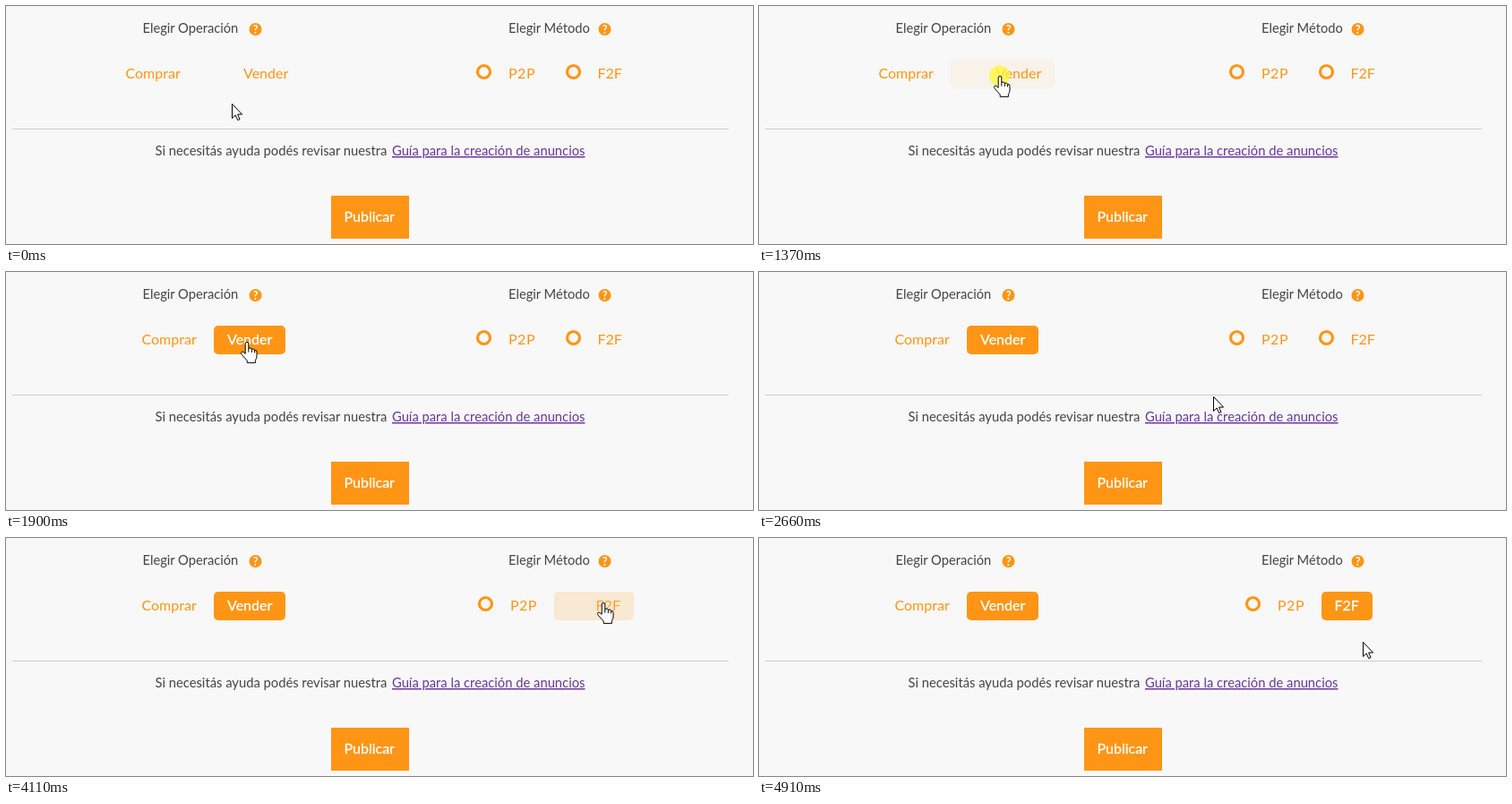
An HTML page that plays this animation: 834x266 px, repeating every 5110 ms.

```html
<!DOCTYPE html>
<html lang="es">
<head>
<meta charset="utf-8">
<title>Publicar anuncio</title>
<style>
  html, body { margin: 0; width: 100%; height: 100%; overflow: hidden; background: #f8f8f8; }
  svg { display: block; width: 834px; height: 266px; font: 16px Lato, sans-serif; fill: #ff9515; }
  .title { font-size: 14.7px; fill: #444; }
  .help { font-size: 14.75px; fill: #444; }
  .link { font-size: 14.75px; fill: #6a359c; text-decoration: underline 1px; }
  .strong { fill: #fff; stroke: #fff; stroke-width: .3px; }
  .mark { font-size: 12.5px; font-weight: bold; fill: #fff; text-anchor: middle; }
  .ring { fill: none; stroke: #ff9515; stroke-width: 3.2px; }
  .pointer { fill: #fff; stroke: #000; stroke-width: 1px; stroke-linejoin: round; }
</style>
</head>
<body>
<svg viewBox="0 0 834 266">
  <text class="title" x="152.5" y="30">Elegir Operación</text>
  <circle cx="278.5" cy="26" r="7"/><text class="mark" x="278.5" y="30.5">?</text>
  <text class="title" x="561" y="30">Elegir Método</text>
  <circle cx="668.5" cy="26" r="7"/><text class="mark" x="668.5" y="30.5">?</text>

  <text id="buy" x="133.5" y="81">Comprar</text>
  <rect id="sellBox" y="60" height="32" rx="5"/>
  <text id="sell" y="81" stroke="#fff" stroke-width=".3">Vender</text>

  <g id="p2p">
    <circle class="ring" cx="533.5" cy="73.5" r="7"/>
    <text x="561" y="81" letter-spacing=".5">P2P</text>
  </g>
  <rect id="f2fBox" y="60" height="32" rx="5"/>
  <circle id="f2fRing" class="ring" cx="633.5" cy="73.5" r="7"/>
  <text id="f2f" y="81" stroke="#fff" stroke-width=".3">F2F</text>

  <rect x="7" y="137" width="800" height="1" fill="#ccc"/>
  <text class="help" x="166.5" y="167">Si necesitás ayuda podés revisar nuestra</text>
  <text class="link" x="431" y="167">Guía para la creación de anuncios</text>
  <rect x="363" y="212" width="87" height="48"/>
  <text class="strong" x="377.5" y="241">Publicar</text>

  <circle id="click" cx="1.5" r="11.5" fill="#fff836" fill-opacity=".75"/>
  <path id="arrow" class="pointer" d="M.5.5V16.5L4.2 13 6.7 18.6 9 17.6 6.6 12.1H11.6Z"/>
  <g id="hand" class="pointer">
    <path d="M.2 2Q.2.5 2 .5T3.8 2V7.2Q7 6.4 7.3 8.2 10.3 7.5 10.6 9.4 13 9 13 11.4V16Q13 18.5 11.4 20.5V23.4H2.2V21L-3.8 14.3Q-5.4 12-3.8 11.2-2.4 10.4.2 13.4Z"/>
    <path fill="none" d="M3.8 7v4.6M7.3 8.2v3.8M10.6 9.4v3"/>
  </g>
</svg>
<script>
const LOOP = 5110;
const HOVER = 0.066;
const $ = id => document.getElementById(id);
const smooth = s => s * s * (3 - 2 * s);
const easeOut = s => 1 - (1 - s) ** 2;
const ramp = (t, from, to) => Math.min(1, Math.max(0, (t - from) / (to - from)));
const mix = (a, b, p) => a + (b - a) * p;

// Each move: start, end, destination x and y, optional easing for y
const moves = [
  [0, 220, 256, 102],
  [620, 700, 258, 100],
  [970, 1340, 267, 78],
  [2295, 2835, 585, 146, easeOut],
  [2840, 3380, 667, 75],
  [3380, 3440, 665, 72],
  [4450, 4910, 674, 116],
];

function pointerAt(t) {
  let x = 252, y = 109;
  for (const [from, to, toX, toY, easeY = smooth] of moves) {
    const s = ramp(t, from, to);
    x = mix(x, toX, smooth(s));
    y = mix(y, toY, easeY(s));
  }
  return [Math.round(x), Math.round(y)];
}

const show = (el, visible) => el.setAttribute('visibility', visible ? 'visible' : 'hidden');
const shift = (el, x, y = 0) => el.setAttribute('transform', `translate(${x} ${y})`);

// Selecting an option pulls both of its sides in by 18 pixels
function drawOption(name, left, right, textX, hover, selected) {
  const box = $(name + 'Box'), label = $(name), inset = 18 * selected;
  box.setAttribute('x', left + inset);
  box.setAttribute('width', right - left - 2 * inset);
  box.setAttribute('fill-opacity', mix(HOVER * hover, 1, selected));
  label.setAttribute('x', textX - inset);
  label.setAttribute('fill', `rgb(255 ${mix(149, 255, selected)} ${mix(21, 255, selected)})`);
  label.setAttribute('stroke-opacity', selected);
}

function draw(t) {
  const sold = smooth(ramp(t, 1600, 1900));
  const faced = smooth(ramp(t, 4050, 4350));
  drawOption('sell', 214, 330, 265, ramp(t, 1150, 1370), sold);
  drawOption('f2f', 610, 703, 660.5, ramp(t, 3200, 3440), faced);
  shift($('buy'), 18 * sold);
  shift($('p2p'), 18 * faced);
  show($('f2fRing'), t < 4050);

  const [x, y] = pointerAt(t);
  const overOption = y < 92 && (x < 312 || x > 610);
  for (const id of ['arrow', 'hand', 'click']) shift($(id), x, y);
  show($('arrow'), !overOption);
  show($('hand'), overOption);
  show($('click'), (t >= 1350 && t < 1630) || (t >= 3950 && t < 4080));
}

const start = performance.now();
function tick() {
  draw((performance.now() - start) % LOOP);
  requestAnimationFrame(tick);
}
tick();
</script>
</body>
</html>
```
